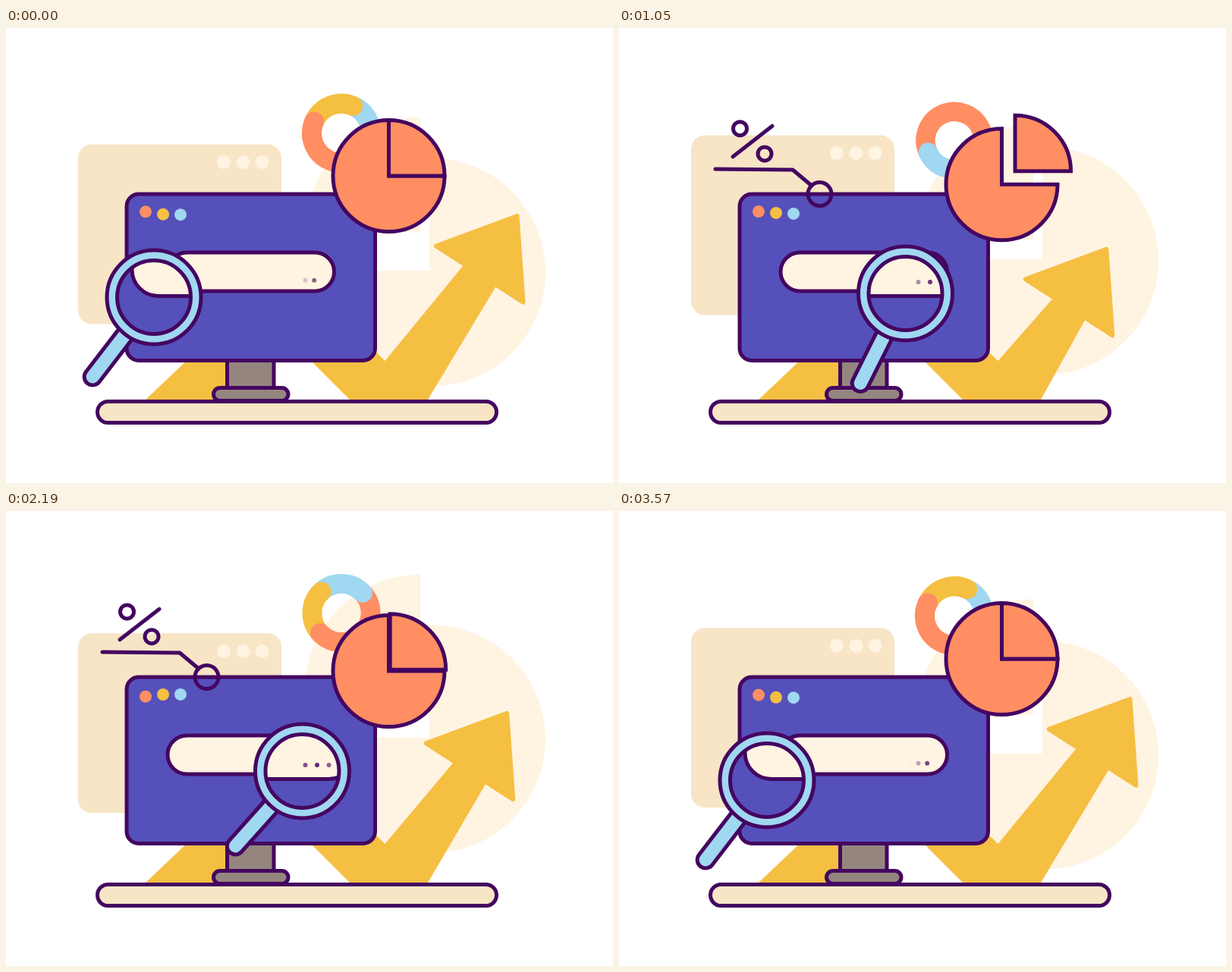
Write an HTML page with a canvas that moves like this. It is 800x600 px and loops after 3.6 s.

```html
<!DOCTYPE html>
<html lang="en">
<head>
<meta charset="utf-8">
<title>Search analytics</title>
<style>
  html, body { margin: 0; width: 100%; height: 100%; overflow: hidden; background: #fff; }
  canvas { display: block; width: 800px; height: 600px; }
</style>
</head>
<body>
<canvas id="stage" width="800" height="600"></canvas>
<script>
const g = document.getElementById('stage').getContext('2d');
const LOOP = 3600, TAU = Math.PI * 2;
const INK = '#440660', INDIGO = '#5650bb', CORAL = '#ff8e63', GOLD = '#f5bf42',
      SKY = '#a0d7f1', SAND = '#f7e5c6', CREAM = '#fff3e2', GREY = '#94867f';

const rad = d => d * Math.PI / 180;
const clamp = v => Math.max(0, Math.min(1, v));
const ramp = (t, a, b) => clamp((t - a) / (b - a));
const bump = (t, a, b) => Math.sin(Math.PI * ramp(t, a, b)) ** 2;
// Cosine swing, n cycles per loop, highest value at the given phase in degrees
const swing = (t, mid, amp, phase = 0, n = 1) =>
  mid + amp * Math.cos(TAU * n * t / LOOP - rad(phase));

// Smooth monotone curve through [time, value] keys
function track(keys, t) {
  const last = keys.length - 1;
  if (t <= keys[0][0]) return keys[0][1];
  if (t >= keys[last][0]) return keys[last][1];
  const rate = i => (keys[i + 1][1] - keys[i][1]) / (keys[i + 1][0] - keys[i][0]);
  const slope = i => {
    if (i === 0 || i === last) return 0;
    const a = rate(i - 1), b = rate(i);
    return a * b > 0 ? 2 * a * b / (a + b) : 0;
  };
  let i = 0;
  while (t > keys[i + 1][0]) i++;
  const [t0, v0] = keys[i], [t1, v1] = keys[i + 1];
  const h = t1 - t0, u = (t - t0) / h, w = 1 - u;
  return v0 * (1 + 2 * u) * w * w + v1 * u * u * (3 - 2 * u)
       + h * u * w * (slope(i) * w - slope(i + 1) * u);
}

function paint(fill, line, width = 5) {
  if (fill) { g.fillStyle = fill; g.fill(); }
  if (line) { g.strokeStyle = line; g.lineWidth = width; g.stroke(); }
}
function disc(x, y, r, fill, line, width) {
  g.beginPath();
  g.arc(x, y, r, 0, TAU);
  paint(fill, line, width);
}
function box(x0, y0, x1, y1, r, fill, line) {
  g.beginPath();
  g.roundRect(x0, y0, x1 - x0, y1 - y0, r);
  paint(fill, line);
}
function poly(points, fill, line, width) {
  g.beginPath();
  points.forEach(p => g.lineTo(p[0], p[1]));
  if (fill) g.closePath();
  paint(fill, line, width);
}
function sector(x, y, r, from, to, fill, line) {
  g.beginPath();
  g.moveTo(x, y);
  g.arc(x, y, r, rad(from), rad(to));
  g.closePath();
  paint(fill, line);
}
function arc(x, y, r, from, to, line, width) {
  g.beginPath();
  g.arc(x, y, r, rad(from), rad(to));
  paint(null, line, width);
}

function backdrop(t) {
  const y = swing(t, 308, 12);
  g.save();
  g.beginPath();
  g.rect(558, 0, 242, 600);
  g.rect(0, y, 558, 600);
  g.clip();
  disc(560.5, y + 2, 150.5, CREAM);
  g.restore();
  sector(546, swing(t, 258.8, 26, 66), 152, 180, 270, CREAM);
}

function backWindow(t) {
  const y = swing(t, 153.5, 12.4, 270);
  box(95, y, 363, y + 237, 18, SAND);
  for (const x of [287, 312.5, 337.5]) disc(x, y + 23.5, 9, CREAM);
}

const SPIN = [[0, 203], [420, 144], [1050, -24], [1830, -171], [2550, -281],
              [3090, -438], [3570, -514], [3600, -517]];
function donut(t) {
  const y = swing(t, 139.5, 9, 95);
  const burst = ((t % 1800) - 880) / 70;
  const size = swing(t, 51.3, 0.7, 0, 2) + 4.5 * Math.exp(-burst * burst);
  const end = track(SPIN, t), mid = size * 0.75, width = size / 2;
  arc(442, y, mid, end - 180, end, CORAL, width);
  arc(442, y, mid, end, end + 90, GOLD, width);
  arc(442, y, mid, end + 90, end + 180, SKY, width);
  [CORAL, GOLD, SKY].forEach((c, i) => {
    const a = rad(end + 90 * i);
    disc(442 + mid * Math.cos(a), y + mid * Math.sin(a), width / 2, c);
  });
}

function arrow(t) {
  const k = (1 - swing(t, 0, 1, 0, 2)) / 2;
  const at = (x, y) => [x - 33.5 * k, y + 47 * k];
  poly([[184, 490], [300, 380], [300, 490]], GOLD);
  poly([[404, 441], [453, 490], [556, 490], at(645, 342), at(640, 320),
        at(602, 314), [499.5, 439], [470, 410]], GOLD);
  g.lineJoin = 'round';
  poly([at(673.5, 248), at(567, 287.5), at(681.5, 361.5)], GOLD, GOLD, 6);
  g.lineJoin = 'miter';
}

function loader(t, x, y, gap, r) {
  for (let i = 0; i < 3; i++) {
    g.globalAlpha = (1 - Math.cos(TAU * (t / 600 - i / 6))) / 2 * 0.85;
    disc(x + i * gap, y, r, INK);
  }
  g.globalAlpha = 1;
}

function computer(t) {
  box(291.5, 430, 353, 480, 0, GREY, INK);
  box(273.5, 474.5, 372, 491.5, 8.5, GREY, INK);
  box(120.5, 492.5, 646.5, 520.5, 14, SAND, INK);
  box(159, 219, 486.5, 438.5, 16, INDIGO, INK);
  disc(184, swing(t, 243.8, 1.9, 218, 4), 8, CORAL);
  disc(207, swing(t, 244, 2, -32, 4), 8, GOLD);
  disc(230, swing(t, 244, 2.2, -5, 4), 8, SKY);
  box(213, 296, 432.5, 347, 25.5, CREAM, INK);
  loader(t, 382.8, 332.7, 11.7, 2.9);
}

const RING_IN = [[200, 0], [420, 140], [560, 180]];
const WIPE_FROM = [[2480, 238], [2550, 260], [3090, 510], [3130, 522]];
const WIPE_TO = [[2480, 598], [2550, 575], [3090, 527], [3130, 522]];
const LEADER = [[220, 0], [420, 50], [850, 135], [2350, 135], [2550, 108], [2950, 0]];
const PERCENT = [[600, 0], [930, 1], [2300, 1], [2550, 0.36], [2680, 0]];
const TILT = [[600, -30], [1050, -38], [1830, -45.6], [2550, -30]];

function callout(t) {
  g.lineCap = g.lineJoin = 'round';

  // The ring opens from its left side and is wiped from the upper left
  const half = track(RING_IN, t);
  const from = t < 1800 ? 182 - half : track(WIPE_FROM, t);
  const to = t < 1800 ? 182 + half : track(WIPE_TO, t);
  if (to > from) arc(264.5, 219, 15.5, from, to, INK, 5);

  // Leader: 33 px of slope, then 102 px of level run
  const len = track(LEADER, t);
  if (len > 0) {
    const k = Math.min(1, len / 33), run = Math.max(0, len - 33);
    const pts = [[254, 208], [254 - 25 * k, 208 - 21 * k]];
    if (run) pts.push([229 - run, 187 - run / 102]);
    poly(pts, null, INK, 5);
  }

  const show = track(PERCENT, t);
  if (show > 0) {
    const a = rad(track(TILT, t)), y = 149.5 + 32 * (1 - show);
    const dx = 33 * show * Math.cos(a), dy = 33 * show * Math.sin(a);
    poly([[176 - dx, y - dy], [176 + dx, y + dy]], null, INK, 5);
    const r = 9 * clamp(show * 2 - 1), sway = swing(t, 0, 0.4, 183);
    if (r > 0) {
      disc(159.5, 132.6 + sway, r, null, INK, 5);
      disc(192, 166 - sway, r, null, INK, 5);
    }
  }
  g.lineCap = 'butt';
  g.lineJoin = 'miter';
}

const SPLIT = [[740, 0], [1050, 17.5], [1300, 21], [1860, 21], [2260, 0]];
function pie(t) {
  const press = bump(t, 60, 780) + 0.3 * bump(t, 2260, 2640);
  const out = track(SPLIT, t);
  const x = 504.5 - 9.7 * press, y = swing(t, 204, 9, 180) + 8.8 * press;
  const a = -90 - 19.5 * press, b = 18.5 * press;
  sector(x, y, 73.5, b, a + 360, CORAL, INK);
  sector(x + out, y - out, 73.5, a, b, CORAL, INK);
}

// Time, lens centre, handle angle from vertical
const PATH = [
  [0, 195, 355, 37.6], [420, 377.5, 364.5, 44.4], [1050, 377.5, 350, 26.6],
  [1830, 396, 335, 49.6], [2550, 375.5, 360.5, 28.3], [2715, 315, 378, 23],
  [3090, 205.5, 359, 34.1], [3350, 195, 355, 37.6]
];
const COLS = [1, 2, 3].map(c => PATH.map(k => [k[0], k[c]]));
function magnifier(t) {
  const [x, y, tilt] = COLS.map(keys => track(keys, t));
  g.save();
  g.translate(x, y);
  g.rotate(rad(tilt));
  box(-11, 50, 11, 143.5, 11, SKY, INK);
  g.restore();

  disc(x, y, 62, SKY, INK);
  g.save();
  g.beginPath();
  g.arc(x, y, 48.5, 0, TAU);
  g.clip();
  g.fillStyle = INDIGO;
  g.fill();
  box(166, 284, 460, 353.5, 34.75, CREAM, INK);
  loader(t, 394.5, 335, 15.5, 3);
  g.restore();
  disc(x, y, 48.5, null, INK);
}

const PARTS = [backdrop, backWindow, donut, arrow, computer, callout, pie, magnifier];
function draw() {
  const t = performance.now() % LOOP;
  g.fillStyle = '#fff';
  g.fillRect(0, 0, 800, 600);
  PARTS.forEach(part => part(t));
  requestAnimationFrame(draw);
}
draw();
</script>
</body>
</html>
```
